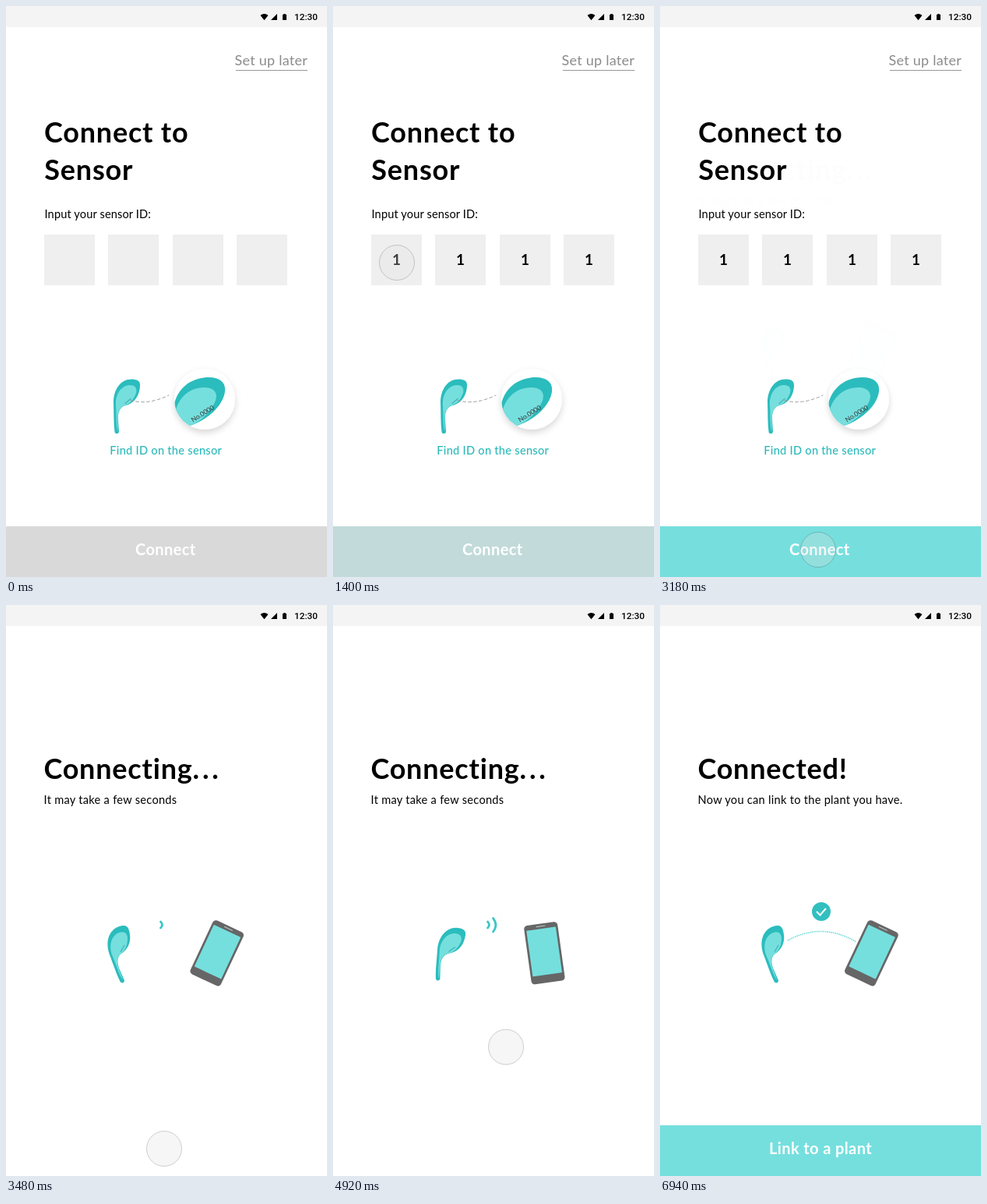
Recreate the animation shown at these times as an HTML page. Size 412x732 px, loop 7500 ms.

```html
<!DOCTYPE html>
<html lang="en">
<head>
<meta charset="utf-8">
<title>Connect to Sensor</title>
<style>
  html, body { margin: 0; width: 100%; height: 100%; overflow: hidden; background: #fff; }
  svg { display: block; width: 100%; height: 100%; font-family: Lato, "Open Sans", sans-serif; }
  .title { font-size: 36px; font-weight: 700; letter-spacing: .8px; }
  .note { font-size: 14.6px; letter-spacing: .28px; }
  .btn { font-size: 20px; font-weight: 700; letter-spacing: .4px; fill: #fff; text-anchor: middle; }
  .digit { font-size: 19px; font-weight: 700; text-anchor: middle; }
  .line { fill: none; stroke-linecap: round; }
</style>
</head>
<body>
<svg viewBox="0 0 412 732">
  <defs>
    <g id="sensor">
      <path fill="#2bbcbd" d="M139.500 546C138 535 138.500 522 138 508C138 492 147 478.500 161 478.500C169 478.500 172.500 481 172 487C171.500 497 167 509 152 512.500C147 514.500 143.800 519 143.800 529L145 545.500C145 549 140 549 139.500 546Z"/>
      <path fill="#75dfde" d="M141 512C140 499 147 487 158 486C166 485.500 168.500 490 167 496C164 504 160 510 151 512.500C146 515 143.200 520 143.200 531L143.500 545C141 540 142 525 141 512Z"/>
      <path class="line" stroke="#45b5b6" stroke-width="1.300" d="M153 509.500L160 503.500"/>
    </g>
    <clipPath id="lens"><circle cx="255" cy="504" r="39"/></clipPath>
    <filter id="shadow" x="-30%" y="-30%" width="160%" height="160%">
      <feDropShadow dx="0" dy="4" stdDeviation="4" flood-color="#000" flood-opacity=".16"/>
    </filter>
  </defs>

  <g id="setup">
    <text x="293.500" y="76" font-size="18" letter-spacing=".25" fill="#8b8b8b">Set up later</text>
    <path d="M295 82.500H387" stroke="#979797"/>
    <text class="title" x="49" y="175">Connect to</text>
    <text class="title" x="49.300" y="223">Sensor</text>
    <text class="note" x="49.500" y="272" style="letter-spacing:.13px">Input your sensor ID:</text>
    <g id="boxes"></g>
    <use href="#sensor"/>
    <path class="line" stroke="#999" stroke-dasharray="3.500 3.500" d="M160 505.500Q182 512 209 499"/>
    <circle cx="255" cy="504" r="39" fill="#fff" filter="url(#shadow)"/>
    <g clip-path="url(#lens)">
      <path fill="#2bbcbd" d="M215 520C215 496 233 476 260 476C278 476 284 486 280 499C275 516 256 532 234 539Z"/>
      <path fill="#75dfde" d="M217 522C220 503 235 489 254 489C268 489 273 497 268 508C262 521 250 533 234 539L222 540Z"/>
    </g>
    <text transform="translate(254 525) rotate(-32)" font-size="8.500" text-anchor="middle" fill="#333">No.0000</text>
    <text class="note" x="133.300" y="575" fill="#2bb9ba" style="font-weight:500">Find ID on the sensor</text>
    <rect id="bar" y="667" width="412" height="65"/>
    <text class="btn" x="204.800" y="704">Connect</text>
  </g>

  <g id="wait">
    <text class="title" x="48.400" y="223">Connecting<tspan letter-spacing="3.800">...</tspan></text>
    <text class="note" x="48.500" y="255">It may take a few seconds</text>
    <g class="line" stroke="#3cc6c8" stroke-width="2.800">
      <path class="arc" d="M198.500 406Q202.500 410 198.500 414"/>
      <path class="arc" d="M205.500 401.500Q212.500 410 205.500 419"/>
      <path class="arc" d="M212.500 395Q223 410.500 212.500 426"/>
    </g>
  </g>

  <g id="done">
    <text class="title" x="48.400" y="223">Connected!</text>
    <text class="note" x="48.500" y="255">Now you can link to the plant you have.</text>
    <path class="line" stroke="#6fd9d9" stroke-width="1.600" style="stroke-linecap:butt" stroke-dasharray="1.500 1" d="M164 430Q208 406 252 432"/>
    <circle cx="207" cy="393" r="12" fill="#32bfc0"/>
    <path class="line" stroke="#fff" stroke-width="2" d="M201.500 393.500L205.500 397.500L212.500 389.500"/>
    <rect y="667" width="412" height="65" fill="#75dfde"/>
    <text class="btn" x="206" y="704">Link to a plant</text>
  </g>

  <g id="pair">
    <g id="swingSensor"><use href="#sensor" x="-153" y="-513"/></g>
    <g id="phone">
      <rect x="-21.700" y="-38" width="43.400" height="76" rx="4.500" fill="#666"/>
      <rect x="-19" y="-31.500" width="38" height="59.300" rx="1" fill="#75dfde"/>
      <path class="line" d="M-5.500 -34.800H5.500" stroke="#b5c4c4" stroke-width="1.100"/>
    </g>
  </g>

  <rect width="412" height="27" fill="#f4f4f4"/>
  <path d="M326.500 12Q331.500 8 336.500 12L331.500 18.300ZM340 18L348 10V18ZM355 11H356.300V10H358.700V11H360V18H355Z"/>
  <text x="370" y="18" font-size="11.800" font-weight="500" style="font-family:Roboto,sans-serif">12:30</text>

  <circle id="touch" r="22.500" fill="#dedede" fill-opacity=".28" stroke="#000" stroke-opacity=".18"/>
</svg>

<script>
const LOOP = 7500;
const $ = id => document.getElementById(id);
const clamp = v => Math.min(1, Math.max(0, v));
const lerp = (a, b, k) => a + (b - a) * k;
const span = (t, a, b) => clamp((t - a) / (b - a));
const ease = (t, a, b) => { const u = span(t, a, b); return u * u * (3 - 2 * u); };

$('boxes').innerHTML = [49, 131, 214, 296].map(x =>
  `<rect x="${x}" y="293" width="65" height="65" fill="#efefef"/>
   <text class="digit" x="${x + 32.5}" y="332">1</text>`).join('');
const digits = document.querySelectorAll('.digit');
const arcs = document.querySelectorAll('.arc');

// Touch moves: start, end, x, y, optional curve control point
const home = [425, -23.6];
const moves = [
  [200, 1130, 82, 329, 150, 180],
  [2005, 2245, 191, 667],
  [2505, 2725, 203, 697],
  [4440, 4995, 223, 560],
  [6145, 6390, 228, 662],
  [6390, 6630, 398, 89],
  [6805, 6950, 440, -30]
];

function touchAt(t) {
  let [x, y] = home;
  for (const [a, b, x2, y2, cx = (x + x2) / 2, cy = (y + y2) / 2] of moves) {
    if (t < a) break;
    const k = ease(t, a, b);
    x = lerp(lerp(x, cx, k), lerp(cx, x2, k), k);
    y = lerp(lerp(y, cy, k), lerp(cy, y2, k), k);
  }
  return [x, y];
}

// Swinging between two tilts while connecting
const START = 3460, BEAT = 500, levels = [1, 2, 3, 2, 3];

function beatAt(t) {
  const b = Math.min(4, Math.max(0, (t - START) / BEAT));
  const n = Math.min(3, Math.floor(b));
  const k = ease(b - n, 0, 1);
  return { swing: n % 2 ? 1 - k : k, level: lerp(levels[n], levels[n + 1], k) };
}

function draw(t) {
  const connecting = ease(t, 3165, 3475);
  const connected = ease(t, 5465, 5825);
  const { swing, level } = beatAt(t);

  $('setup').style.opacity = 1 - connecting;
  $('wait').style.opacity = connecting * (1 - connected);
  $('done').style.opacity = connected;
  $('pair').style.opacity = connecting;

  digits.forEach(d => d.style.opacity = t < 1360 ? 0 : 1);
  const on = span(t, 1360, 1540);
  $('bar').setAttribute('fill', `rgb(${lerp(217, 117, on)},${lerp(217, 223, on)},${lerp(217, 222, on)})`);

  arcs.forEach((a, i) => a.style.opacity = clamp(level - i));
  $('swingSensor').setAttribute('transform', `translate(148.5 447.5) rotate(${lerp(-19.5, 6, swing)})`);
  const px = 270.7 + .7 * Math.max(swing, connected);
  $('phone').setAttribute('transform', `translate(${px} 446.3) rotate(${lerp(25.3, -8.5, swing)})`);

  const [x, y] = touchAt(t);
  $('touch').setAttribute('transform', `translate(${x} ${y})`);
}

function tick() {
  draw(performance.now() % LOOP);
  requestAnimationFrame(tick);
}
tick();
</script>
</body>
</html>
```
